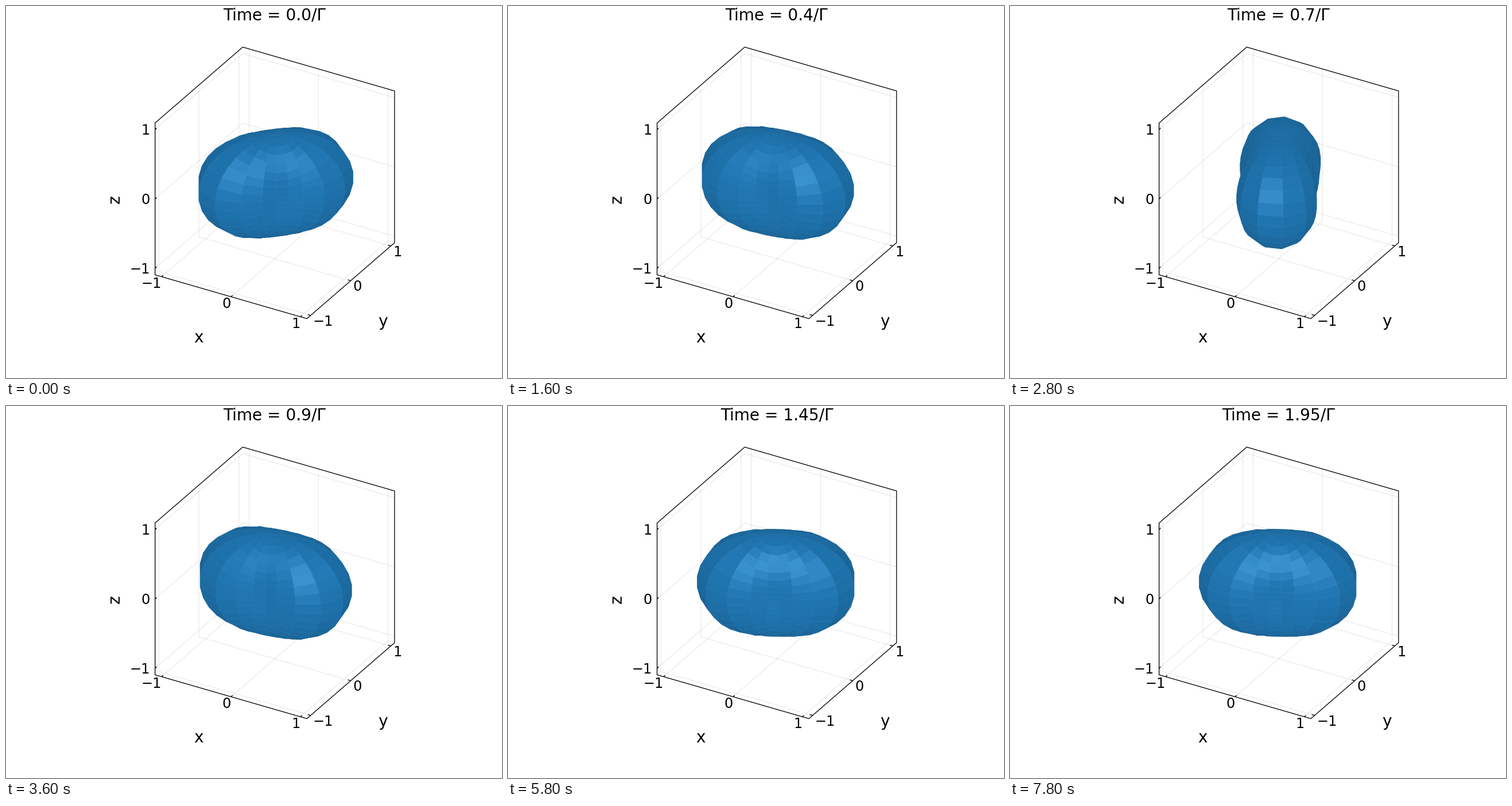
Recreate the animation shown at these times as a matplotlib script. Size 864 by 648 pixels, loop 8000 ms.

```python
import numpy as np
import matplotlib.pyplot as plt
from matplotlib.animation import FuncAnimation
from matplotlib.collections import LineCollection, PolyCollection

W, H, DPI = 864, 648, 144
FRAMES, INTERVAL = 40, 200
CENTER = np.array([468.25, 308.1])
SCALE = 139.6            # pixels per data unit
LIM = 1.09375            # half width of the axes box
BASE = np.array([31, 119, 180]) / 255
TICKS = (-1, 0, 1)

# Orthographic camera: azimuth -60 degrees, elevation 30 degrees
AZ, EL = np.radians(-60), np.radians(30)
RIGHT = np.array([-np.sin(AZ), np.cos(AZ), 0])
UP = np.array([-np.sin(EL) * np.cos(AZ), -np.sin(EL) * np.sin(AZ), np.cos(EL)])
VIEW = np.array([np.cos(EL) * np.cos(AZ), np.cos(EL) * np.sin(AZ), np.sin(EL)])


def project(points):
    p = np.asarray(points, float)
    return CENTER + SCALE * np.stack([p @ RIGHT, -(p @ UP)], axis=-1)


fig = plt.figure(figsize=(W / DPI, H / DPI), dpi=DPI, facecolor="white")
plt.rcParams["font.family"] = "DejaVu Sans"
ax = fig.add_axes([0, 0, 1, 1])
ax.set_xlim(0, W)
ax.set_ylim(H, 0)
ax.axis("off")


def label(x, y, text, px, ha="center", **kw):
    return ax.text(x, y, text, fontsize=px * 72 / DPI, ha=ha, va="baseline",
                   color="black", **kw)


def add_lines(segments, color, px, z):
    ax.add_collection(LineCollection(segments, colors=[color], zorder=z,
                                     linewidths=px * 72 / DPI, capstyle="butt"))


def draw_grid():
    lo, hi = -LIM, LIM
    paths = []
    for t in TICKS:
        paths += [
            [(t, lo, lo), (t, hi, lo), (t, hi, hi)],
            [(hi, t, lo), (lo, t, lo), (lo, t, hi)],
            [(lo, lo, t), (lo, hi, t), (hi, hi, t)],
        ]
    add_lines([project(p) for p in paths], (0, 0, 0, 0.1), 1, 1)


def draw_box():
    lo, hi = -LIM, LIM
    corners = [(lo, lo, lo), (hi, lo, lo), (hi, hi, lo),
               (hi, hi, hi), (lo, hi, hi), (lo, lo, hi)]
    ax.add_patch(plt.Polygon(project(corners), closed=True, fill=False,
                             edgecolor="black", linewidth=1.3 * 72 / DPI, zorder=4))


def draw_ticks():
    lo, hi, size = -LIM, LIM, 0.042
    marks = []
    for t in TICKS:
        text = str(t).replace("-", "\u2212")
        ends = [((t, lo, lo), (t, lo + size, lo)),
                ((hi, t, lo), (hi - size, t, lo)),
                ((lo, lo, t), (lo, lo + size, t))]
        marks += [project(e) for e in ends]
        x, y, z = (project(e[0]) for e in ends)
        label(x[0] - 0.3, x[1] + 19.8, text, 24, "right")
        label(y[0] + 4.3, y[1] + 17.7, text, 24, "left")
        label(z[0] - 8.9, z[1] + 9, text, 24, "right")
    add_lines(marks, "black", 1.3, 4)


draw_grid()
draw_box()
draw_ticks()
label(335.5, 586, "x", 28)
label(656, 558, "y", 28)
label(197.5, 336.5, "z", 28, rotation=90, rotation_mode="anchor")
title = label(468, 24.4, "", 28)

body = PolyCollection([], zorder=3, linewidths=0.3)
ax.add_collection(body)

theta, phi = np.meshgrid(np.linspace(0, np.pi, 20),
                         np.linspace(0, 2 * np.pi, 20), indexing="ij")
DIRS = np.stack([np.sin(theta) * np.cos(phi),
                 np.sin(theta) * np.sin(phi), np.cos(theta)], axis=-1)


def surface(angle):
    """Quads of the aligned distribution with its long axis at angle."""
    r = 0.712 + 0.288 * np.sin(theta) ** 2 * np.cos(2 * (phi - angle))
    p = r[..., None] * DIRS
    quads = np.stack([p[:-1, :-1], p[1:, :-1], p[1:, 1:], p[:-1, 1:]], axis=2)
    return quads.reshape(-1, 4, 3)


def shade(facing):
    d = facing[:, None]
    return np.clip(BASE * (0.8 + 0.2 * d) + 0.11 * d ** 20, 0, 1)


def update(i):
    t = round(0.05 * i, 2)
    quads = surface(np.pi / 4 + 2 * np.pi * t)
    mid = quads.mean(axis=1)
    normal = np.cross(quads[:, 2] - quads[:, 0], quads[:, 3] - quads[:, 1])
    normal /= np.linalg.norm(normal, axis=1, keepdims=True)
    normal *= np.sign((normal * mid).sum(axis=1, keepdims=True))
    facing = normal @ VIEW

    order = np.argsort(mid @ VIEW)
    order = order[facing[order] > 0]
    colors = shade(facing[order])
    body.set_verts(project(quads[order]))
    body.set_facecolor(colors)
    body.set_edgecolor(colors)
    title.set_text(f"Time = {t}/\u0393")
    return body, title


anim = FuncAnimation(fig, update, frames=FRAMES, interval=INTERVAL,
                     init_func=lambda: update(0), repeat=True, repeat_delay=0)
plt.show()
```
